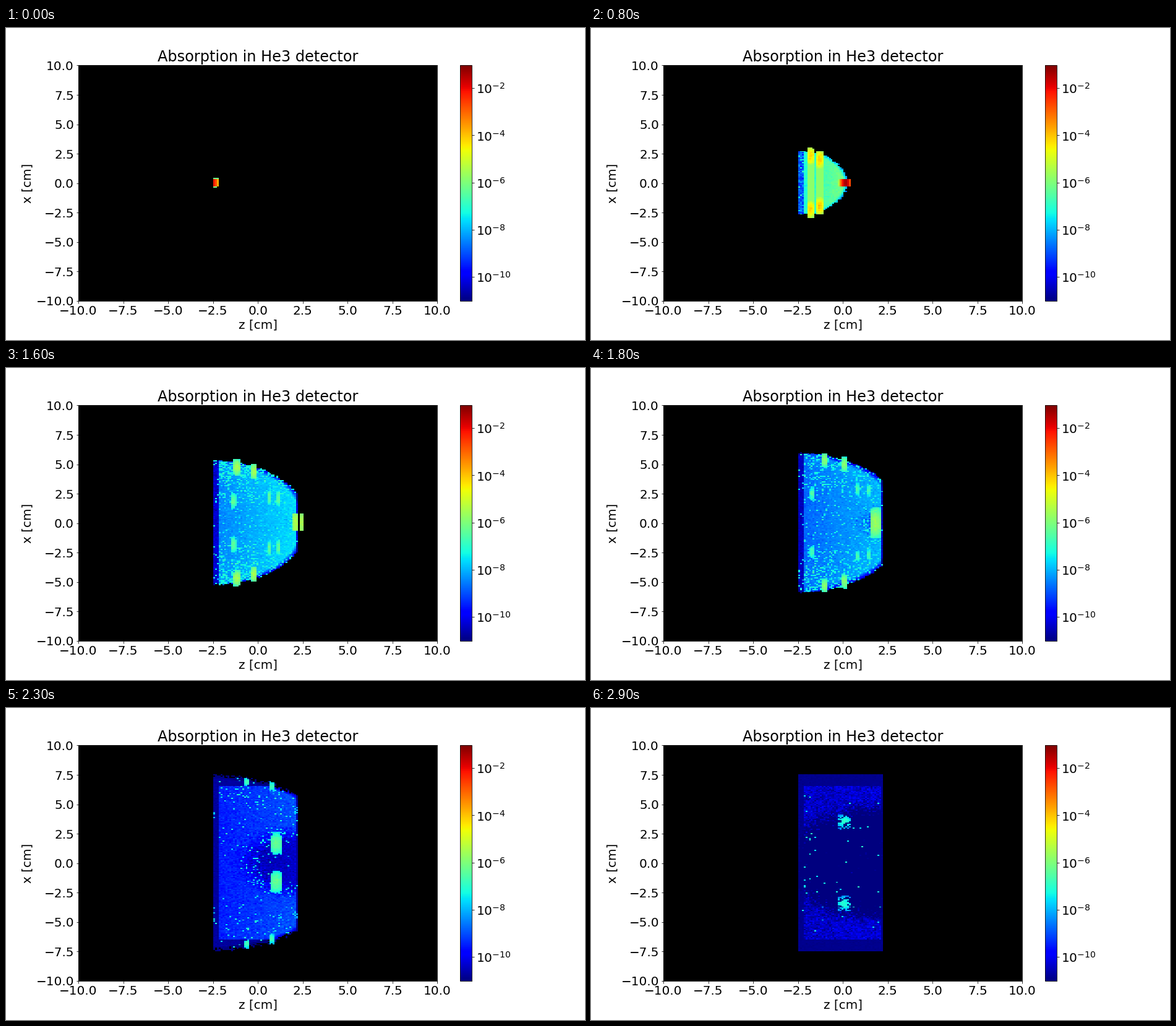
Write a matplotlib script that moves like this. It is 936x504 px and loops after 3000 ms.

```python
import numpy as np
import matplotlib.pyplot as plt
from matplotlib.animation import FuncAnimation
from matplotlib.colors import LogNorm

FRAMES = 30
VMAX = 0.093
plt.rcParams.update({
    "font.family": "DejaVu Sans",
    "font.size": 20,
    "figure.subplot.bottom": 0.125,
    "figure.subplot.top": 0.88,
})

# Detector volume: 0.1 cm cells, gas surrounded by a thin wall
Z, X = np.meshgrid(np.arange(-2.45, 2.5, 0.1), np.arange(-7.45, 7.5, 0.1))
AX = np.abs(X)
RADIUS = np.hypot(Z + 2.5, X)
WALL = (Z < -2.2) | (Z > 2.15) | (AX > 6.5)


def put(level, mask, value):
    """Raise the masked cells to value where they are empty or lower."""
    level[mask] = np.fmax(level, value)[mask]


def blob(level, rng, z, x, half, width, peak):
    """Mirrored pair of patches at +-x, merged while x is small."""
    u = (AX - max(x, 0)) / half
    u = np.where((AX < x) & (x < half), 0, u)
    s = 2 * (Z - z) / width
    edge = np.clip((x + half) / half, 0, 1)
    density = (peak + 8) / 1.5 * (1.45 - 0.8 * u**2 - 0.4 * s**2)
    mask = (np.abs(u) < edge) & (np.abs(s) < 1)
    mask &= rng.random(Z.shape) < density
    grain = rng.normal(0, 0.12, Z.shape)
    put(level, mask, peak - 1.2 * u**2 - 0.5 * s**2 + grain)


def background(n, rng):
    """Diffuse cloud growing from the entry window, fading with time."""
    reach = max(0.2 + 0.32 * n, 0.47)
    depth = reach - RADIUS
    spread = np.clip(AX / reach, 0, 1) ** 2
    front = min(-2.2 + 0.325 * n, 2.15) + 0.05
    along = np.clip((Z + 2.2) / (front + 2.2), 0, 1)
    left, right = -6 - 0.155 * n, -4.2 - 0.21 * n
    level = left + (right - left) * along + 0.15 * spread
    level += rng.normal(0, 0.1 + 0.22 * (n / FRAMES) ** 6, Z.shape)

    # Dark wake spreading back from the exit wall
    wake = 0.35 * (n - 15.8) - np.hypot(0.9 * (Z - 2.3), X)
    blur = rng.normal(0, 0.25, Z.shape)
    level -= 1.3 * np.clip((wake + blur) / 1.3 + 0.5, 0, 1)

    wall = -11 + 2.1 * np.exp((8 - n) / 7)
    wall = wall + rng.normal(0, np.exp(-n / 8), Z.shape)
    level = np.where(WALL, np.minimum(wall, level), level)

    rim = np.clip(1 - depth / (0.15 + 0.015 * n), 0, 1)
    level -= 2.8 * rim * np.clip((Z + 2.3) / 2, 0.2, 1)

    # Single bright cells
    chance = 0.7 / (1 + np.exp((n - 18.5) / 2)) * (0.08 + spread) + 0.005
    near_wake = (np.abs(wake - 0.1) < 0.6) & (AX < 2.6)
    chance += 0.25 * np.exp(-0.24 * (n - 18)) * near_wake
    hit = rng.random(Z.shape) < np.where(WALL, 0.35 * chance, chance)
    put(level, hit, rng.normal(-7.35, 0.2, Z.shape))

    ragged = 0.1 + 0.07 * max(0, n - 19)
    visible = rng.random(Z.shape) < depth / ragged
    return np.where(visible & (Z < front), level, np.nan)


def field(n):
    rng = np.random.default_rng(40 + n)
    level = background(n, rng)

    # Rings scattered forward by the entry window
    peak = -2.8 - 0.17 * n
    half = min(0.2 + 0.07 * n, 0.75 * np.cos((n - 10) / 13))
    for z, x in ((-2.45 + 0.079 * n, -0.2 + 0.307 * n),
                 (-2.4 + 0.136 * n, -0.45 + 0.3 * n)):
        put(level, (np.abs(Z - z) < 0.17) & (AX < x), -3 - 0.35 * n)
        blob(level, rng, z, x, half, 0.34, peak)

    # Rings that start in the middle of the gas
    m = n - 12
    peak = -5.7 - 0.16 * m
    half = min(0.9 - 0.05 * m, 0.9)
    blob(level, rng, 0.3 + 0.08 * m, 0.75 + 0.35 * m, half, 0.22, peak)
    blob(level, rng, 0.58 + 0.136 * m, 0.75 + 0.33 * m, half, 0.22, peak)
    blob(level, rng, -0.75 - 0.16 * m, 0.6 + 0.31 * m, half, 0.3, peak)

    # Rings leaving the exit wall, backward and forward
    m = n - 21
    peak = -6.05 - 0.13 * m
    half = min(1.05 - 0.05 * m, 1.3)
    x = 1 + 0.31 * m
    width = np.clip(0.35 + 0.14 * (n - 16), 0.35, 0.62)
    blob(level, rng, 1.3 - 0.155 * m, x, half, width, peak)
    blob(level, rng, 3.1 + 0.14 * m, x, half, 0.22, peak)

    # The beam pulse itself
    u = (Z + 2.5 - 0.328 * n) / 0.28
    pulse = min(-1.4, -2.2 + 0.1 * n) - 2 * u**2
    put(level, (np.abs(u) < 1) & (AX < 0.3), pulse)
    return np.ma.masked_invalid(10 ** np.maximum(level, -11))


fields = [field(n) for n in range(FRAMES)]

fig, ax = plt.subplots(figsize=(13, 7), dpi=72)
ax.set_facecolor("black")
image = ax.imshow(fields[0], cmap="jet", norm=LogNorm(VMAX * 1e-10, VMAX),
                  extent=(-2.5, 2.5, -7.5, 7.5), origin="lower",
                  aspect="auto", interpolation="nearest")
bar = fig.colorbar(image, ax=ax)
bar.set_ticks([10.0**p for p in range(-10, 0, 2)])
bar.minorticks_off()
ticks = np.linspace(-10, 10, 9)
ax.set(xlim=(-10, 10), ylim=(-10, 10), xticks=ticks, yticks=ticks,
       xlabel="z [cm]", ylabel="x [cm]", title="Absorption in He3 detector")


def update(n):
    image.set_data(fields[n])
    return [image]


anim = FuncAnimation(fig, update, frames=FRAMES, interval=100,
                     repeat=True, repeat_delay=0)
plt.show()
```
